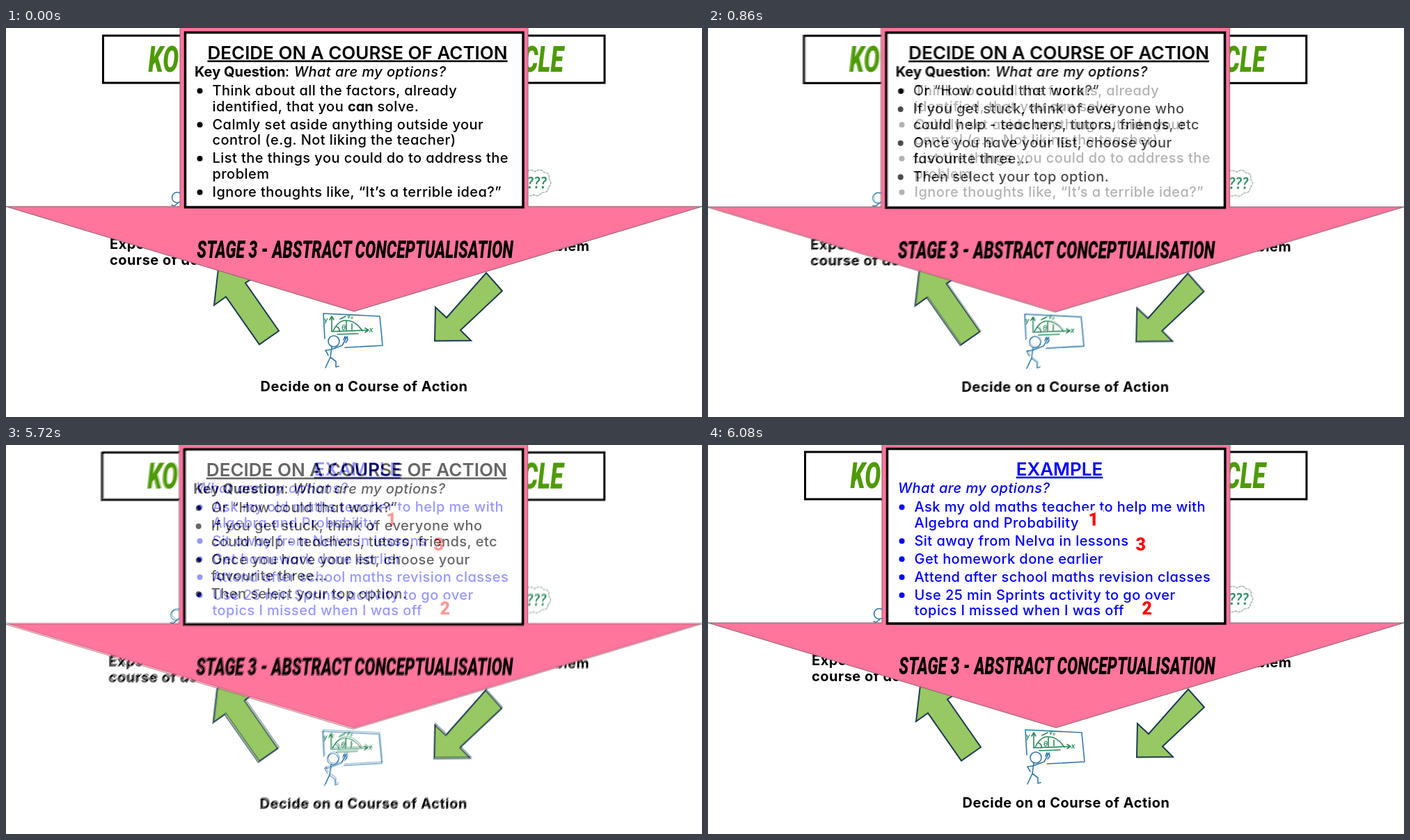
Recreate the animation shown at these times as an HTML page. Size 1000x560 px, loop 8 s.

```html
<!DOCTYPE html>
<html lang="en">
<head>
<meta charset="utf-8">
<title>Decide on a course of action</title>
<style>
  html, body { margin: 0; width: 100%; height: 100%; overflow: hidden; background: #fff; }
  svg { display: block; width: 100vw; height: 100vh; }
  text { font: 500 20px Inter, "Open Sans", sans-serif; font-feature-settings: "cv11"; letter-spacing: .45px; }
  .label { font-weight: 700; letter-spacing: .5px; }
  .bold { font-weight: 700; letter-spacing: 0; }
  .italic { font-style: italic; }
  .heading { font-size: 26px; font-weight: 600; letter-spacing: 0; text-anchor: middle;
    text-decoration: underline; text-decoration-thickness: 2px; text-underline-offset: 3px; }
  .comic { font: italic 900 35px Roboto, "Open Sans", sans-serif; letter-spacing: 0; }
  .title { font-size: 51px; fill: #4e9a06; }
  .rank { font: 900 25px Roboto, "Open Sans", sans-serif; fill: #f00; text-anchor: middle; }
  .mark { font: italic 700 22px Lato, sans-serif; letter-spacing: 0; fill: #2f8f63; text-anchor: end; }
  .tiny { font: italic 700 11px Lato, sans-serif; letter-spacing: 0; fill: #2f8f63; }
  .blue, .green { fill: none; stroke-width: 1.6; stroke-linecap: round; stroke-linejoin: round; }
  .blue { stroke: #3079a6; }
  .green { stroke: #2a8759; }
  .arrow { fill: #97c863; stroke: #1d3a54; stroke-width: 2; }
</style>
</head>
<body>
<svg viewBox="0 0 1000 560" xmlns="http://www.w3.org/2000/svg">
  <defs>
    <g id="scene">
      <rect x="139.500" y="11" width="720.500" height="68" fill="#fff" stroke="#000" stroke-width="3"/>
      <text class="comic title" transform="translate(204.500 63) scale(.67 1)">KO</text>
      <text class="comic title" transform="translate(801 63) scale(.67 1)" text-anchor="end">CLE</text>

      <g class="blue">
        <circle cx="246" cy="244" r="7.500"/>
        <path d="M247 252L242 256 238 255"/>
      </g>
      <path d="M745 209q8-8 15-2q8-6 13 1q9 0 7 9q6 7-1 12q1 8-9 8q-5 7-12 3q-7 4-13-3"
        fill="none" stroke="#a3b8a9" stroke-width="1.500" stroke-dasharray="4 1"/>
      <text class="mark" x="777" y="231">???</text>

      <text class="label" x="149" y="318">Experiment with a</text>
      <text class="label" x="149" y="341">course of action</text>
      <text class="label" x="838.500" y="321" text-anchor="end">Define the problem</text>
      <text class="label" x="514.500" y="523" text-anchor="middle">Decide on a Course of Action</text>

      <path class="arrow" d="M306 338L299 399 316 387 364 455.500 392 436 344 367 364 354Z"/>
      <path class="arrow" d="M616 450.500L617 402 633 417 690 352.500 713 378.500 653 435 668 450Z"/>

      <path class="blue" d="M458 447L456 411 537 415 541 457 487 460"/>
      <g class="green">
        <path d="M468 437V416M465 420l3-5 3 5M468 437L520 435M516 432l5 3-5 3"/>
        <path d="M470 436Q478 420 489 421Q502 421 512 436M480 419L488 415M489 422V435M476 441L506 440"/>
        <path d="M475 430q5 2 4 7M497 426v8"/>
      </g>
      <text class="tiny" x="457" y="424">y</text>
      <text class="tiny" x="522" y="438">x</text>
      <text class="tiny" x="482" y="435">θ</text>
      <text class="tiny" x="490" y="418">v₀</text>
      <g class="blue">
        <circle cx="471" cy="451" r="8"/>
        <path d="M468 459L466 474 459 489M466 474L474 480 474 488 478 487M467 463L459 464 463 471M467 463L483 457 488 448M485 449l2-5 1 4 2-4 1 5-3 4"/>
      </g>

      <path d="M250 -3H750V257H1000L500 408 0 257H250Z" fill="#ff759c" stroke="#85616c"/>
      <rect x="257.500" y="6.500" width="485.500" height="251.500" fill="#fff" stroke="#000" stroke-width="3.500"/>
      <text class="comic" transform="translate(501.500 331) scale(.65 1)" text-anchor="middle">STAGE 3 - ABSTRACT CONCEPTUALISATION</text>
    </g>
  </defs>
  <g id="stage"></g>
</svg>
<script>
const LOOP = 8000, STEP = 60, STEPS = 10;
const DECIDE = 'DECIDE ON A COURSE OF ACTION';
const QUESTION = 'What are my options?';

// Each bullet is a list of its lines.
const slides = [
  {
    start: 0, placement: '', color: '#000', heading: DECIDE, keyed: true,
    bullets: [
      ['Think about all the factors, already', 'identified, that you <tspan class="bold">can</tspan> solve.'],
      ['Calmly set aside anything outside your', 'control (e.g. Not liking the teacher)'],
      ['List the things you could do to address the', 'problem'],
      ['Ignore thoughts like, “It’s a terrible idea?”']
    ]
  },
  {
    start: 500, placement: 'translate(-2.5 .2) scale(1.0025)', color: '#000', heading: DECIDE, keyed: true,
    bullets: [
      ['Or “How could that work?”'],
      ['If you get stuck, think of everyone who', 'could help - teachers, tutors, friends, etc'],
      ['Once you have your list, choose your', 'favourite three…'],
      ['Then select your top option.']
    ]
  },
  {
    start: 5540, placement: 'translate(0 -1)', color: '#00f', heading: 'EXAMPLE', keyed: false,
    bullets: [
      ['Ask my old maths teacher to help me with', 'Algebra and Probability'],
      ['Sit away from Nelva in lessons'],
      ['Get homework done earlier'],
      ['Attend after school maths revision classes'],
      ['Use 25 min Sprints activity to go over', 'topics I missed when I was off']
    ],
    ranks: [[1, 554, 117], [3, 622, 153], [2, 631, 245]]
  }
];

const text = (x, y, content, cls = '') => `<text class="${cls}" x="${x}" y="${y}">${content}</text>`;

function bulletList(bullets) {
  let y = 97, out = '';
  for (const lines of bullets) {
    out += `<circle cx="278.5" cy="${y - 6.5}" r="4"/>`;
    lines.forEach((line, i) => {
      if (i) y += 22.7;
      out += text(296.5, y, line);
    });
    y += 26;
  }
  return out;
}

const rankMark = ([n, x, y]) =>
  `<rect x="${x - 14}" y="${y - 22}" width="28" height="26" fill="#fff"/>` + text(x, y, n, 'rank');

function slideMarkup({ placement, color, heading, keyed, bullets, ranks = [] }) {
  const question = keyed
    ? text(271, 70, 'Key Question', 'bold') + text(401, 70, ':') + text(414, 70, QUESTION, 'italic')
    : text(273, 70, QUESTION, 'italic');
  return `<g><rect width="1000" height="560" fill="#fff"/>
    <g transform="${placement}"><use href="#scene"/>
      <g fill="${color}">
        ${text(505, 44.5, heading, 'heading')}${question}${bulletList(bullets)}${ranks.map(rankMark).join('')}
      </g>
    </g></g>`;
}

const stage = document.getElementById('stage');
stage.innerHTML = slides.map(slideMarkup).join('');
const layers = [...stage.children];

// Every slide dissolves over the previous one in even, discrete steps.
function fade(start, time) {
  if (start === 0) return 1;
  const step = Math.floor((time - start) / STEP) + 1;
  return Math.max(0, Math.min(1, step / STEPS));
}

function render(time) {
  slides.forEach(({ start }, i) => layers[i].setAttribute('opacity', fade(start, time)));
}

const origin = performance.now();
function tick() {
  render((performance.now() - origin) % LOOP);
  requestAnimationFrame(tick);
}
render(0);
requestAnimationFrame(tick);
</script>
</body>
</html>
```
